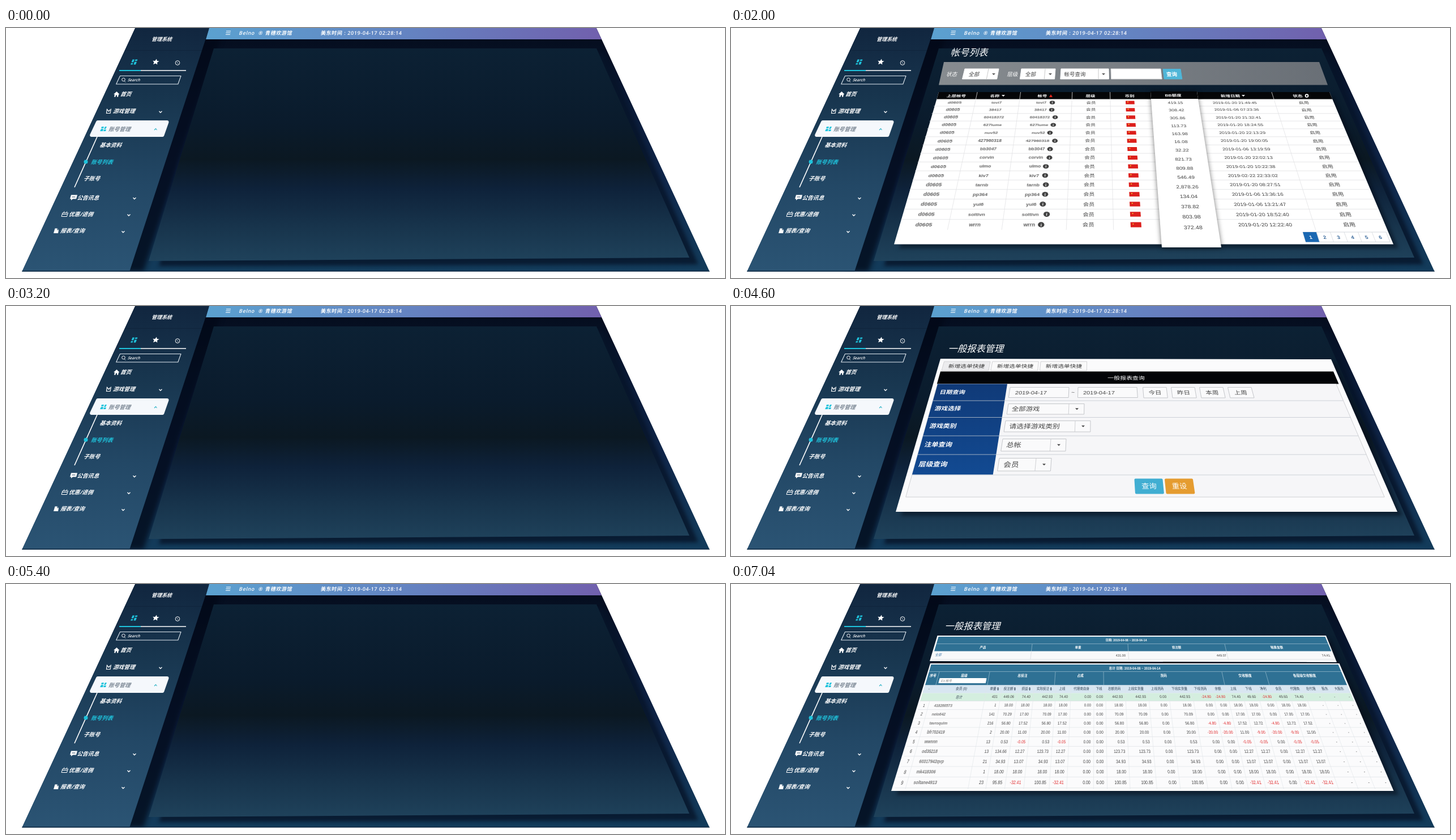
Animation of 1270 by 441 pixels, one loop 8000 ms. Source, as an HTML page:

```html
<!DOCTYPE html>
<html lang="zh">
<head>
<meta charset="utf-8">
<style>
html,body{margin:0;width:100%;height:100%;overflow:hidden;background:#fff}
svg{display:block;font-family:"Open Sans","Noto Sans CJK SC",sans-serif}
.page{font-family:"Liberation Sans","Noto Sans CJK SC",sans-serif}
.card{filter:drop-shadow(9px 7px 3px rgba(4,12,26,.55))}
.raised{filter:drop-shadow(0 1px 4px rgba(0,0,0,.55))}
.soft{filter:blur(.45px)}
</style>
</head>
<body>
<svg id="stage" width="1270" height="441" viewBox="0 0 1270 441"></svg>
<script>
// Everything lies on one tilted plane whose upright lines meet at (VX, -VY).
const VX = 645, VY = 855;
const X = (x, y0, y) => VX + (x - VX) * (y + VY) / (y0 + VY);
const rowY = (first, last, n, i) => {
  const a = 1 / (first + VY), b = 1 / (last + VY);
  return 1 / (a + (b - a) * i / (n - 1)) - VY;
};
const path = (d, fill, extra = '') => `<path d="${d}" fill="${fill}" ${extra}/>`;
const stroke = (d, color, w = 1) => path(d, 'none', `stroke="${color}" stroke-width="${w}"`);
// x1 and x2 hold at y1 and are projected down to y2
const quad = (x1, x2, y1, y2, fill, extra) =>
  path(`M${x1} ${y1}H${x2}L${X(x2, y1, y2)} ${y2}H${X(x1, y1, y2)}Z`, fill, extra);
const round = (x1, x2, y1, y2, fill, line = fill, w = 1) =>
  quad(x1, x2, y1, y2, fill, `stroke="${line}" stroke-width="${w}" stroke-linejoin="round"`);
const upright = (x, y1, y2, color, w = .8) => stroke(`M${x} ${y1}L${X(x, y1, y2)} ${y2}`, color, w);
const level = (x1, x2, y0, y, color, w = .8) => stroke(`M${X(x1, y0, y)} ${y}H${X(x2, y0, y)}`, color, w);
// k is the height of text lying on the plane; 0 keeps it at its plain size
function text(x, y, s, size, fill = '#fff', { k = 0, anchor = 'start', w = 400, more = '' } = {}) {
  const a = k ? (y + VY) / 987 : 1, d = k ? a * a * k : 1, c = (x - VX) / (y + VY) * d;
  return `<text transform="matrix(${a} 0 ${c} ${d} ${x} ${y})" y="${size * .36}" font-size="${size}" fill="${fill}" text-anchor="${anchor}" font-weight="${w}" ${more}>${s}</text>`;
}
const caret = (x, y, color = '#555', r = 3) => path(`M${x - r} ${y - r / 2}h${2 * r}l${-r} ${r}z`, color);
const gradient = (id, stops, flat) =>
  `<linearGradient id="${id}" x2="${flat ? 1 : 0}" y2="${flat ? 0 : 1}">` +
  stops.map(([o, c]) => `<stop offset="${o}" stop-color="${c}"/>`).join('') + '</linearGradient>';
const range = n => [...Array(n).keys()];

function frame() {
  const cyan = '#1fc3dc';
  let s = '<defs>' +
    gradient('floor', [[0, '#040b1a'], [.3, '#0a1a36'], [.6, '#10264a'], [1, '#133c5b']]) +
    gradient('side', [[0, '#11263f'], [.3, '#18364f'], [.65, '#234866'], [1, '#2b5474']]) +
    gradient('bar', [[0, '#5ba1d0'], [.5, '#6484c2'], [1, '#7160ad']], true) +
    gradient('panel', [[0, '#0c2134'], [.35, '#0a1b2c'], [.52, '#0b1822'], [.66, '#0e223a'], [.85, '#18354d'], [1, '#1f425b']]) +
    gradient('grey', [[0, '#878c90'], [1, '#696f76']], true) +
    gradient('blue', [[0, '#103a78'], [1, '#124a92']]) +
    '<clipPath id="edge"><path d="M228 0H1043L1243 429.500H28Z"/></clipPath></defs><g clip-path="url(#edge)">';
  s += path('M228 0H1043L1243 430H28Z', 'url(#floor)');
  s += path('M345 0H385L243 430H200Z', '#020817', 'opacity=".75" style="filter:blur(5px)"');
  s += path('M384 44H1056L1223 417L270 420Z', '#071428', 'opacity=".8" style="filter:blur(3px)"');
  s += path('M367 36H1043L1207 405L252 411Z', 'url(#panel)');
  s += path('M228 0H359L218 430H28Z', 'url(#side)');
  s += path('M359 0H1043L1052 20H353Z', 'url(#bar)');
  s += stroke('M28 429H1243', '#0b2038', 1.5) + stroke('M210 39.500H346', '#0d2138', .6) + '</g>';

  s += stroke('M389 5.500h8M388.500 8.500h8M388 11.500h8', '#fff', 1);
  const bar = { w: 600, more: 'letter-spacing=".6"' };
  s += text(412, 9, 'Belno', 9, '#fff', bar) + text(446, 9, '®', 9, '#fff', bar) +
    text(458, 9, '青穗欢游馆', 9, '#fff', bar) + text(556, 9, '美东时间 : 2019-04-17 02:28:14', 9, '#fff', bar);

  // Side menu
  s += text(276, 20, '管理系统', 9, '#fff', { w: 700, anchor: 'middle' });
  s += path('M223.500 55.500h3.500l-2 5h-3.500zM228.500 55.500h4l-1 2.500h-4zM227 59.500h4l-2 5h-3.500zM221 62h3.500l-1 2.500h-3.500z', cyan);
  s += path('M266 54.500l.7 3.500 4 .5-3.700 2.300.3 3.700-3.200-2-4 1.700 1.400-3.700-2.200-2.700 4 .1z', '#fff');
  s += '<circle cx="303" cy="61.500" r="3.800" fill="none" stroke="#fff"/>' + stroke('M301.500 60l3 3', '#fff', .8);
  s += stroke('M200 75H238', cyan, 2) + stroke('M238 75H318', '#fff', 1.6);
  s += round(201.500, 309, 84.500, 99, 'none', '#dfe8ef', 1.1);
  s += '<circle cx="207.500" cy="91" r="2.800" fill="none" stroke="#fff" stroke-width=".9"/>' + stroke('M209 93.500l2 2', '#fff', .9);
  s += text(215.500, 91.500, 'Search', 6.8, '#fff', { w: 600 });
  s += round(162, 284.500, 166, 189, '#f5f8fc', '#f5f8fc', 6);
  s += stroke('M161 192L121 281', '#fff', 1.6) + `<circle cx="141" cy="236" r="3.500" fill="${cyan}"/>`;
  s += path('M169 174h4l-1 3h-4zM175 174h3l-2 4h-3zM168 178h4l-1 4h-5zM173 179h4l-1 3h-4z', cyan);
  for (const [x, y, label, color] of [
    [203, 117, '首页'], [190, 147, '游戏管理'], [182, 178, '账号管理', '#7d8996'], [166.500, 207, '基本资料'],
    [151, 237, '账号列表', cyan], [138, 266, '子账号'], [126.500, 299.500, '公告讯息'], [112, 329, '优惠/退佣'], [97, 358, '报表/查询']
  ]) s += text(x, y, label, 9.7, color, { w: 700 });
  for (const [x, y] of [[273, 148], [227, 300.500], [217, 330], [207, 359.500]])
    s += stroke(`M${x - 2.500} ${y - 1.300}l2.300 2.600 2.700-2.600`, '#fff', 1.3);
  s += stroke('M262 180l2.500-2.500 2 2.500', '#35b5c8', 1.2);
  s += path('M190 117l5.500-5 5 5h-1.500l-1 4.500h-2v-3h-2l-.5 3h-2.500l1-4.500z', '#fff');
  s += stroke('M178.500 142.500l-1 8h6.500l1.500-8M179 144l2.500 3 2.500-3', '#fff', 1.2);
  s += path('M115 294.500h11l-2 7h-6l-3 2.500v-2.500h-2z', '#fff') + stroke('M116.500 298h6', '#23405c', 1);
  s += stroke('M100 326h9.500l-2 6.500h-9.500zM99 328.500h9M102 326l1-2.500M106 326l2-2.500', '#fff', 1);
  s += path('M86.500 353.500h4l2.500 3-1 5.500h-8z', '#fff') + path('M90 353.500l2.500 3h-2.500z', '#54708a');
  return s;
}

function accounts() {
  const names = 'tovi7 38417 60418372 627lume nuv52 427960318 bb3047 corvin ulmo kiv7 tarnb pp364 yul6 soltivn wrrn'.split(' ');
  const sums = '419.15 308.42 305.86 113.73 163.98 16.08 32.22 821.73 809.88 546.49 2,878.26 134.04 378.82 803.98 372.48'.split(' ');
  const times = ('20 21:49:45,06 07:23:36,20 21:32:41,20 18:24:55,20 22:13:29,20 19:00:05,06 13:19:59,20 22:02:13,' +
    '20 10:22:38,22 22:33:02,20 08:27:51,06 13:36:16,06 13:21:47,20 18:52:40,20 12:22:40').split(',');
  const mid = { k: .7, anchor: 'middle' }, head = { ...mid, w: 700 }, ink = '#404040';
  const masked = { ...head, more: 'class="soft"' };
  let s = text(389, 43.500, '帐号列表', 16.5);
  s += path('M376 60H1039L1054 100.500H367Z', 'url(#grey)');
  s += text(381, 82, '状态', 9.5) + text(488, 81.500, '层级', 9.5);
  for (const [x1, x2, tx, label] of [[413, 473, 420, '全部'], [513, 573, 520, '全部'], [583, 667, 588.500, '帐号查询']]) {
    s += round(x1, x2, 72, 90, '#fff') + upright(x2 - 18, 72, 90, '#bbb') + caret(x2 - 9, 81.500);
    s += text(tx, 81.500, label, 9.5, '#444');
  }
  s += round(671, 759, 72, 90, '#fff', '#ddd') + round(763, 794, 72.500, 90, '#4fb6d8') + text(769, 81.500, '查询', 9.5, '#fff', { w: 600 });

  s += '<g class="card">' + path('M367 113H1057L1170 381.500H288Z', '#fff') + '</g>' + quad(367, 1057, 113, 125.500, '#050608');
  for (const x of [431, 509, 602, 670, 961])
    s += upright(X(x, 132, 113), 113, 125, '#ddd') + upright(X(x, 132, 125), 125, 356, '#e2e3e5');
  for (const i of range(14)) s += level(360, 1062, 132, rowY(131.500, 347, 15, i + .5), '#dfe0e2');
  for (const [x, label] of [[398, '上层帐号'], [466, '名称'], [550, '帐号'], [635, '层级'], [704, '币别'], [882, '新增日期'], [1001, '状态']])
    s += text(x, 119.500, label, 8.6, '#fff', head);
  s += caret(481, 119.500, '#fff') + caret(905, 119.500, '#fff') + path('M562 122h6l-3-5z', '#e2231a');
  s += '<circle cx="1017" cy="119.500" r="2.400" fill="none" stroke="#fff" stroke-width="1.800"/>';

  s += '<g class="raised">' + path('M741 112H823L866 387H761Z', '#fff') + '</g>' + path('M741 112H823L825 125H742Z', '#050608');
  s += text(781, 119, 'BB额度', 8.6, '#fff', head);
  names.forEach((name, i) => {
    const y = rowY(131.500, 347, 15, i), y2 = rowY(132, 352, 15, i), z = (y + VY) / 987, at = x => X(x, 132, y);
    s += text(at(395), y, 'd0605', 8.6, '#606060', masked) + text(at(469), y, name, 7.8, '#606060', masked);
    s += text(at(548), y, name, 7.8, '#606060', masked);
    const ix = at(556 + name.length * 2.3);
    s += `<ellipse cx="${ix}" cy="${y}" rx="${4.700 * z}" ry="${3.200 * z * z}" fill="#444"/>`;
    s += text(ix, y, 'i', 7, '#fff', head) + text(at(636) - i * .2, y, '会员', 8.5, ink, mid);
    const fx = at(697) - i * .2, fy = y - 3 * z * z, fh = 6 * z * z;
    s += quad(fx, fx + 15.500 * z, fy, fy + fh, '#dc1f1c') + `<circle cx="${fx + 4 * z}" cy="${fy + fh * .35}" r="1" fill="#f7d32c"/>`;
    s += text(X(785, 132, y2), y2, sums[i], 8.8, ink, mid);
    s += text(at(890), y, `2019-0${i == 9 ? 2 : 1}-${times[i]}`, 8.4, ink, mid) + text(at(1012), y, '启用', 8.8, ink, mid);
  });
  s += quad(1010, 1157, 360, 377.500, '#fff', 'stroke="#d5d9de"') + quad(1010, 1034, 360, 377.500, '#1b68b2');
  for (const i of range(6)) {
    if (i) s += upright(1009.500 + i * 24.500, 360, 377.500, '#d5d9de');
    s += text(1024 + i * 24.600, 369, i + 1, 7.600, i ? '#3a6a9c' : '#fff', head);
  }
  return s;
}

function query() {
  const k = .78, mid = { k, anchor: 'middle' }, ink = '#444', line = '#c4c6ca';
  let s = text(385, 75, '一般报表管理', 16.3);
  s += '<g class="card">' + path('M370 93L1060 94L1177 363H291Z', '#fbfbfc') + '</g>';
  for (const i of range(3)) {
    s += round(376.500 + i * 85.300, 458 + i * 85.300, 98, 114, i ? '#fafafa' : '#ececee', '#c9c9cc', .8);
    s += text(416 + i * 86, 106, '新增选单快捷', 11, '#333', mid);
  }
  s += quad(370, 1064, 115.500, 137.500, '#030407') + text(698, 127, '一般报表查询', 11, '#fff', mid);
  s += quad(365, 1069, 137.500, 337, '#f6f6f8', `stroke="${line}" stroke-width=".8"`) + quad(365, 488, 137.500, 297.500, 'url(#blue)');
  for (const y of [167, 196.500, 229, 262, 298]) s += level(365, 1069, 137.500, y, '#c2c8d0');
  [['日期查询', 369, 151.500], ['游戏选择', 360, 181], ['游戏类别', 351, 211.500], ['注单查询', 342, 244.500], ['层级查询', 332, 279]]
    .forEach(([label, x, y]) => s += text(x, y, label, 11, '#fff', { k, w: 700 }));
  for (const x of [493, 613]) s += round(x, x + 104, 143.500, 161.500, '#fafafb', line) + text(x + 9, 152.500, '2019-04-17', 10.7, ink, { k });
  s += text(604, 152.500, '~', 10, ink, mid);
  ['今日', '昨日', '本周', '上周'].forEach((label, i) => {
    const x = 727.500 + i * 50;
    s += round(x, x + 41.500, 143.500, 162, '#fafafb', line) + text(x + 21.500 + i * .4, 152.500, label, 11.200, ink, mid);
  });
  for (const [x1, x2, y1, y2, tx, label] of [
    [490, 624, 172.500, 191, 496, '全部游戏'], [485, 635, 202.500, 222, 491.500, '请选择游戏类别'],
    [480, 592, 234.500, 256, 486.500, '总帐'], [474, 566, 268.500, 291, 481.500, '会员']
  ]) {
    s += round(x1, x2, y1, y2, '#fafafb', line) + upright(x2 - 27, y1, y2, line);
    s += caret(x2 - 13, (y1 + y2) / 2, '#444') + text(tx, (y1 + y2) / 2, label, 11.800, ink, { k });
  }
  for (const [x, label, color] of [[714.500, '查询', '#41aed2'], [768, '重设', '#e59c30']])
    s += round(x, x + 46, 306.500, 329.500, color, color, 4) + text(x + 24, 318, label, 11.200, '#fff', mid);
  return s;
}

function report() {
  const teal = '#2f7194', ink = '#444', pale = '#8db4c8', mid = { k: 1.15, anchor: 'middle' }, bold = { ...mid, w: 700 };
  const end = { k: 1.05, anchor: 'end' }, span = '日期: 2019-04-08 ~ 2019-04-14';
  let s = text(379, 74, '一般报表管理', 16.3);
  s += '<g class="card">' + path('M364.500 91H1051L1070 138L351 136Z', '#f8f9fa') +
    path('M352 140H1074.500L1170.500 365H283Z', '#fbfbfc') + '</g>';
  s += quad(366.500, 1049.500, 93, 118.500, teal) + level(366.500, 1049.500, 93, 105.500, pale);
  s += text(698, 99, span, 5.4, '#fff', bold);
  [[445, '产品'], [613, '单量'], [787, '投注额'], [964, '输赢金额']].forEach(([x, label]) => s += text(x, 112, label, 5.6, '#fff', bold));
  for (const x of [532, 701, 872]) s += upright(x, 106, 118, pale) + upright(X(x, 106, 118), 118, 133, '#d8dce0');
  s += level(366, 1050, 93, 133, '#d8dce0') + text(361, 125, '全部', 5.6, '#4a7fae', { k: 1.15 });
  [[697, '431.00'], [875, '449.07'], [1058, '74.41']].forEach(([x, v]) => s += text(x, 125.500, v, 5.7, ink, end));

  s += quad(353.500, 1072.500, 142, 178.500, teal) + level(353.500, 1072.500, 142, 154.500, pale) + text(713, 149, '总计 ' + span, 5.5, '#fff', bold);
  [[357, '序号'], [412, '层级'], [515, '总投注'], [617, '占成'], [764, '洗码'], [908, '交收额度'], [1013, '各层级交收额度']]
    .forEach(([x, label]) => s += text(x, 162, label, 5.6, '#fff', bold));
  for (const x of [368, 457, 573, 658, 867, 944]) s += upright(x, 155, 178, pale);
  s += round(369, 451, 166.500, 174.500, '#fff') + text(371, 170.500, 'EX:帐号', 5.2, '#888', { k: 1.1 });
  s += quad(X(353, 142, 178.500), X(1073, 142, 178.500), 178.500, 192.500, '#d8e6f1');
  s += quad(X(353, 142, 192.500), X(1073, 142, 192.500), 192.500, 206.500, '#d4eedf');
  s += text(350, 185, '-', 5.4, ink, mid) + text(407, 185, '会员 (9)', 5.4, '#345', mid) + text(403, 199, '总计', 5.4, '#345', mid);
  const heads = '单量 投注额 损益 实际投注 上线 代理商自身 下线 总额洗码 上线实货量 上线洗码 下线实货量 下线洗码 余额 上线 下线 净利 会员 代理商 总代理 股东 大股东'.split(' ');
  const headX = [463, 490, 519, 551, 585, 619, 650, 677, 715, 753, 792, 829, 860, 887, 914, 940, 967, 996, 1024, 1049, 1074];
  heads.forEach((label, i) => {
    s += text(headX[i], 185, label, 5.3, '#345', mid);
    if (i < 4) s += path(`M${headX[i] + label.length * 2.8 + 3} 182l1.700 2.500h-3.400zm0 6l1.700-2.500h-3.400z`, '#345');
  });

  const right = [471, 500, 529, 568, 595, 636, 657, 692, 733, 769, 811, 848, 873, 900, 927, 955, 983, 1011, 1041, 1067, 1093];
  right.slice(0, 20).forEach(x => s += upright(X(x + 5, 199, 179), 179, 362, '#e0e4e7', .6));
  s += upright(X(457, 155, 179), 179, 362, '#e0e4e7', .6) + upright(X(353, 199, 206), 206, 362, '#e0e4e7', .6);
  const names = ['', '418260573', 'nelo642', 'tavroqulm', 'bfr702419', 'wwnnn', 'od35218', '60317942qvp', 'mk418306', 'soltane4913'];
  // count, stake, result, valid stake, fee
  const rows = [
    [431, 449.06, 74.4, 442.93, -24.8], [1, 18, 18, 18, 0], [141, 70.29, 17, 70.09, 0], [216, 56.8, 17.52, 56.8, -4.8],
    [2, 20, 11, 20, -20], [13, .53, -.05, .53, 0], [13, 134.66, 12.27, 123.73, 0], [21, 34.93, 13.07, 34.93, 0],
    [1, 18, 18, 18, 0], [23, 95.85, -32.41, 100.85, 0]
  ];
  rows.forEach(([count, stake, result, valid, fee], i) => {
    const y = rowY(199, 350, 10, i), net = result + fee;
    const cells = [stake, result, valid, result, 0, 0, valid, valid, 0, valid, fee, fee, result, net, fee, net, result];
    [count, ...cells.map(v => v.toFixed(2)), '-', '-', '-'].forEach((v, j) =>
      s += text(X(right[j], 199, y), y, v, 5.7, v < 0 ? '#e0292b' : ink, end));
    if (i) {
      s += text(X(341, 214, y), y, i, 5.7, ink, mid);
      s += text(X(359, 214, y), y, names[i], 5.9, '#777', { k: 1.05, w: 700, more: 'class="soft"' });
    }
    s += level(353, 1073, 142, rowY(199, 350, 10, i + .5), '#dfe3e6', .7);
  });
  return s;
}

const stage = document.getElementById('stage');
stage.innerHTML = frame() + [accounts, query, report].map(draw => `<g class="page">${draw()}</g>`).join('');
const pages = stage.querySelectorAll('.page');
const spans = [[200, 3200], [3400, 5400], [5600, 8000]];
const start = performance.now();
function tick() {
  const t = (performance.now() - start) % 8000;
  pages.forEach((page, i) => page.style.display = t >= spans[i][0] && t < spans[i][1] ? '' : 'none');
  requestAnimationFrame(tick);
}
tick();
</script>
</body>
</html>
```
